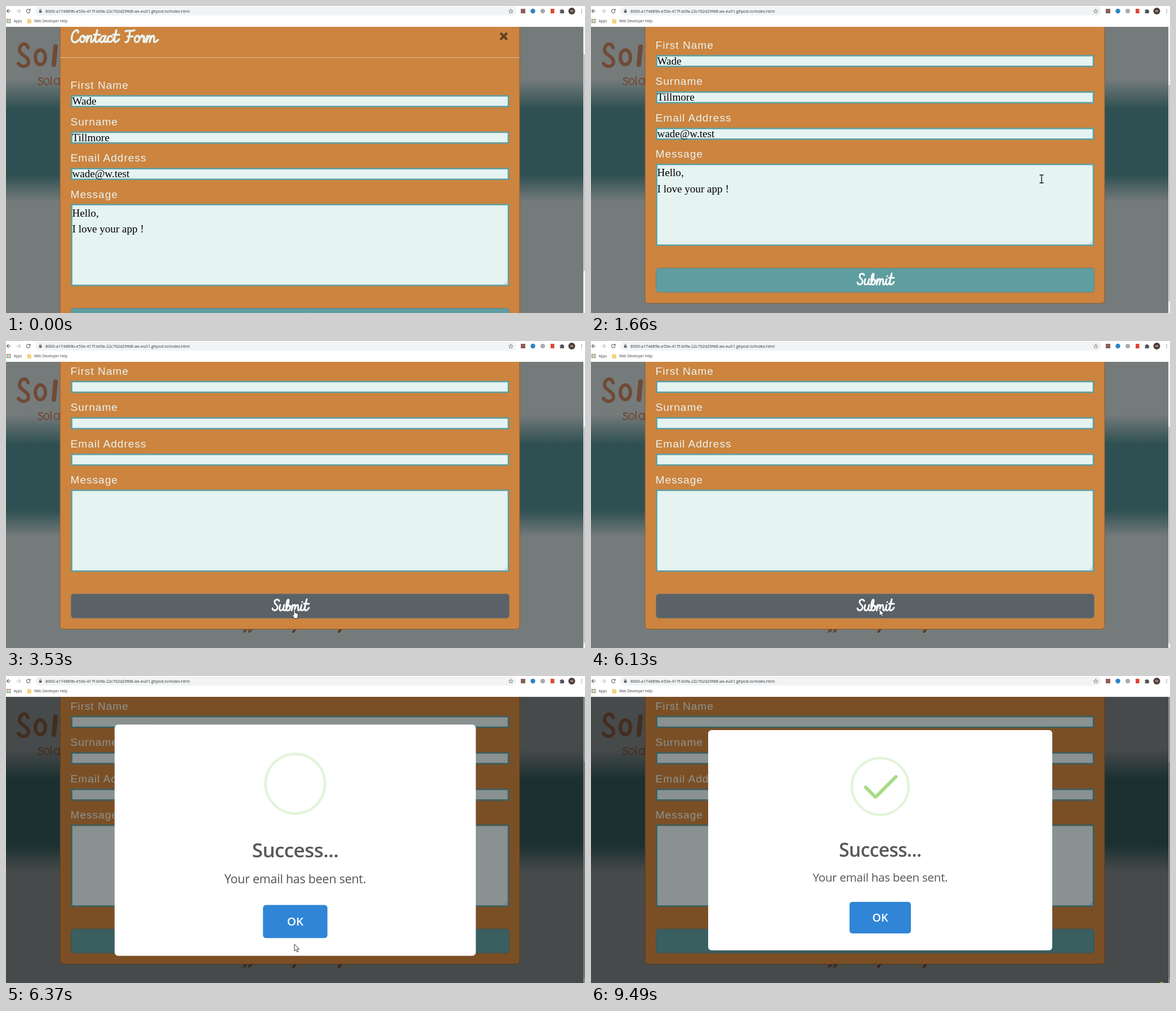
Write an HTML page that moves like this. It is 1028 px wide and 545 px high and loops after 9570 ms.

```html
<!DOCTYPE html>
<html lang="en">
<head>
<meta charset="utf-8">
<title>Contact form</title>
<style>
  html, body { margin: 0; width: 100%; height: 100%; overflow: hidden; background: #fff; }
  svg { display: block; width: 100%; height: 100%; }
  text { white-space: pre; }
  .ui { font-family: "Open Sans", "Noto Sans", sans-serif; }
  .label { font: 19.1px "Liberation Sans", Arial, sans-serif; letter-spacing: 1px; fill: #e9f4f2; }
  .value { font: 19.1px "Liberation Serif", "Times New Roman", serif; fill: #000; }
  .field { fill: #e5f3f1; stroke: #5f9ea0; stroke-width: 2.6; }
  .pen { fill: none; stroke-linecap: round; stroke-linejoin: round; }
  .mid { text-anchor: middle; }
</style>
</head>
<body>
<svg viewBox="0 0 1028 545" preserveAspectRatio="none">
  <defs>
    <linearGradient id="backdrop" gradientUnits="userSpaceOnUse" x1="0" y1="37" x2="0" y2="545">
      <stop offset=".183" stop-color="#757b7b"/>
      <stop offset=".287" stop-color="#2f5052"/>
      <stop offset=".518" stop-color="#2f5052"/>
      <stop offset=".612" stop-color="#757b7b"/>
    </linearGradient>
  </defs>

  <!-- page behind the form -->
  <rect y="37" width="1028" height="508" fill="url(#backdrop)"/>
  <g class="pen" stroke="#704a35">
    <path stroke-width="6" d="M39 74C37 64 25 66 24 77C23 87 40 89 40 99C40 109 27 109 22 102"/>
    <ellipse stroke-width="6" cx="61" cy="91" rx="9" ry="13"/>
    <path stroke-width="8" d="M88 72L85 104"/>
    <path stroke-width="2" d="M65 128Q57 126 58 131Q67 134 64 138Q61 142 57 138M80 125V140M95 128V140"/>
    <ellipse stroke-width="2" cx="72" cy="134" rx="4.5" ry="5.5"/>
    <ellipse stroke-width="2" cx="90" cy="134" rx="4.5" ry="5.5"/>
  </g>
  <path class="pen" stroke="#5c3820" stroke-width="2" d="M424 509L422 517M425 516L428 510M433 509L431 517M434 516L437 510M514 509Q513 518 509 517Q509 514 515 512M596 509Q594 518 590 517Q590 514 597 511"/>

  <!-- form, scrolled as one piece -->
  <g id="form">
    <rect x="96" y="0" width="816" height="599" rx="6" fill="#cc843f" stroke="#8a5a2c" stroke-width="1"/>
    <path class="pen" stroke="#e9f4f2" stroke-width="3.4" role="img" aria-label="Contact Form" transform="translate(115 64)"
      d="M13-17C15-24 4-22 2-10C0 2 9 3 14-4M23-11C17-13 14-2 19 0C25 1 27-9 23-11C22-7 26-7 28-9
      M30-11L28 0C30-7 33-12 36-11C38-9 34 0 37 0C41 0 45-12 47-21C44-10 42 0 45 0C48 0 50-3 51-5M41-13H52
      M61-10C55-14 50-3 53 0C57 2 60-5 62-11C59-3 59 0 62 0C64 0 65-3 66-5M73-9C72-13 65-10 65-4C65 1 71 1 74-3
      C78-7 80-14 81-21C78-10 76 0 79 0C82 0 84-3 86-5M75-13H86M97-19C102-22 108-18 113-21M105-19C104-10 103 2 97 0M101-10H110
      M120-11C114-13 111-2 116 0C122 1 124-9 120-11C120-7 123-7 125-9M127-12C124-10 127-9 129-10C133-12 127 0 130 0C132 0 133-3 134-6
      M136-11L134 0C136-7 139-12 141-11C143-9 140-3 140 0C141-7 145-12 147-11C150-9 146 0 149 0C152 0 153-2 155-4"/>
    <path class="pen" stroke="#5f4020" stroke-width="4" d="M879 49L888.500 58.500M888.500 49L879 58.500"/>
    <path stroke="#e3c3a0" d="M96 91.500H912"/>
    <g id="fields"></g>
    <path class="pen" stroke="#8a9494" stroke-width=".7" d="M885 494L890 489M888 494L890 492"/>
    <rect id="ring" x="113" y="534.500" width="783" height="47" rx="7" fill="none" stroke="#828a91" stroke-opacity=".5" stroke-width="4"/>
    <rect id="button" x="115.500" y="536.500" width="778" height="43" rx="5" stroke="#6c757d" stroke-width=".8"/>
    <path class="pen" stroke="#fff" stroke-width="2.800" role="img" aria-label="Submit" transform="translate(472 566)"
      d="M13-17C11-21 4-20 5-14C6-10 12-9 10-4C8 1 2 1 1-4M15-10C13-5 13 0 16 0C19 0 21-5 22-10C20-4 20 0 23 0
      C26 0 30-14 30-18C30-21 27-20 26-12C25-5 25 0 28 0C33 0 34-8 31-9C31-6 34-6 36-8
      M37-10L35 0C36-6 39-11 41-10C42-9 41-4 40 0C41-6 44-11 46-10C48-8 45 0 48 0C50 0 52-6 53-10C51-4 51 0 54 0
      C57 0 60-10 62-20C59-10 57 0 60 0C62 0 64-2 66-5M57-12H66M54-15h.1"/>
  </g>
  <rect x="1025" y="37" width="3" height="508" fill="#f1f1f1"/>
  <rect id="thumb" x="1025.500" y="86" width="2.500" height="384" fill="#c1c1c1"/>

  <!-- success dialog -->
  <rect id="shade" y="37" width="1028" height="508"/>
  <g id="dialog" class="ui">
    <rect x="208" y="96" width="611" height="391" rx="6" fill="#fff"/>
    <circle cx="513.500" cy="196" r="50.300" fill="none" stroke="#e3f4da" stroke-width="4.500"/>
    <g class="pen" stroke="#a5dc86" stroke-width="6"><path id="tip"/><path id="long"/></g>
    <text class="mid" x="513.500" y="321" font-size="33.500" font-weight="600" letter-spacing="-.6" fill="#595959">Success...</text>
    <text class="mid" x="513.500" y="364.500" font-size="20.500" letter-spacing="-.25" fill="#545454">Your email has been sent.</text>
    <rect x="459" y="401" width="109" height="56" rx="5" fill="#3085d6"/>
    <text class="mid" x="513.500" y="436" font-size="19.500" font-weight="600" fill="#fff">OK</text>
  </g>

  <!-- browser bar -->
  <g class="ui" font-size="6.200" fill="#3c4043">
    <rect width="1028" height="37" fill="#fff"/>
    <rect x="52" y="1" width="854" height="16" rx="8" fill="#f1f3f4"/>
    <g class="pen" stroke="#5f6368" stroke-width="1.100">
      <path d="M8 9H1.500M4.500 6L1.500 9L4.500 12"/>
      <path stroke="#bdc1c6" d="M18.500 9H25.500M22.500 6L25.500 9L22.500 12"/>
      <path d="M42.300 7.200A3.200 3.200 0 1 0 42.700 10M43 5.500V7.800H40.700"/>
      <path stroke-width=".8" d="M59.800 8V6.800A1.300 1.300 0 0 1 62.400 6.800V8"/>
      <path stroke-width=".7" d="M896.300 5.500L897.300 8.200L900.200 8.300L898 10L898.700 12.800L896.300 11.200L893.900 12.800L894.600 10L892.400 8.300L895.300 8.200Z"/>
    </g>
    <rect x="58.800" y="8" width="4.600" height="4" rx=".5" fill="#5f6368"/>
    <text x="70" y="12" font-size="7.260" fill="#303437">8000-a174689b-e53e-417f-b0fa-22c762d29fd8.ws-eu01.gitpod.io/index.html</text>
    <rect x="914" y="5" width="8" height="8" fill="#8b5e57"/>
    <circle cx="935.500" cy="9" r="4.200" fill="#2b83c6"/>
    <circle cx="953" cy="9" r="4" fill="#a9a9b2"/>
    <rect x="967" y="5" width="6.500" height="8" fill="#e0452f"/>
    <path fill="#50545a" d="M983.500 7H985.500A1.500 1.500 0 0 1 988.500 7H990.500V9A1.400 1.400 0 0 1 990.500 11.500V13H983.500V11.200A1.300 1.300 0 0 0 983.500 8.700Z"/>
    <circle cx="1004.500" cy="9" r="6" fill="#4e3a35"/>
    <text class="mid" x="1004.500" y="11.300" font-size="6" fill="#fff">W</text>
    <path class="pen" stroke="#5f6368" stroke-width="1.500" d="M1022 6.500h.01M1022 9.300h.01M1022 12.100h.01"/>
    <g id="apps"></g>
    <text x="13.800" y="29">Apps</text>
    <path fill="#f6d57a" stroke="#d9b653" stroke-width=".5" d="M38 23.500H41L42 24.500H44.500V30.500H38Z"/>
    <text x="50" y="29">Web Developer Help</text>
  </g>

  <ellipse id="spot" cx="1013" cy="546.500" rx="4.500" ry="3" fill="#b9c21f"/>
  <g id="cursor" stroke-linejoin="round">
    <path id="arrow" fill="#fff" stroke="#222" stroke-width=".9" d="M0 0V12L2.800 9.500L4.800 14L6.800 13.100L4.900 8.800H8.500Z"/>
    <path id="beam" fill="none" stroke="#111" stroke-width="1.300" d="M-3.500-7H-1Q0-7 0-6Q0-7 1-7H3.500M0-6V6M-3.500 7H-1Q0 7 0 6Q0 7 1 7H3.500"/>
    <path id="hand" fill="#fff" stroke="#222" stroke-width=".9" d="M-1 9.500V1.200Q.3-.5 1.500 1.200V5.500L5.300 6.600Q6.800 7.200 6.600 8.800L5.600 15.500H0L-3.600 10Q-3.200 8-1 9.500Z"/>
  </g>
</svg>
<script>
const LOOP = 9570;
const $ = id => document.getElementById(id);
const show = (id, on) => $(id).setAttribute("visibility", on ? "visible" : "hidden");
const clamp = v => Math.min(1, Math.max(0, v));
const ramp = (t, start, length) => clamp((t - start) / length);
const mix = (a, b, p) => a + (b - a) * p;
const smooth = p => p * p * (3 - 2 * p);

const held = (t, a, b, n) => {
  const gap = (b - a) / (n - 1);
  return a + gap * Math.floor((Math.min(t, b) - a) / gap + 1e-6);
};

// Interpolates rows of [position, ...values].
const track = (p, rows) => {
  let i = 0;
  while (i < rows.length - 2 && p > rows[i + 1][0]) i++;
  const [from, to] = [rows[i], rows[i + 1]];
  const k = ramp(p, from[0], to[0] - from[0]);
  return from.slice(1).map((v, j) => mix(v, to[j + 1], k));
};

const labels = ["First Name", "Surname", "Email Address", "Message"];
const values = ["Wade", "Tillmore", "wade@w.test"];
$("fields").innerHTML = labels.map((label, i) => {
  const y = 147 + i * 64.6;
  return `<text class="label" x="114.500" y="${y}">${label}</text>
    <rect class="field" x="116.500" y="${y + (i < 3 ? 12.5 : 11.7)}" width="775.500" height="${i < 3 ? 19 : 143.500}"/>
    ${i < 3 ? `<text class="value" x="117.500" y="${y + 28}">${values[i]}</text>` : ""}`;
}).join("") + `<text class="value" x="117.500" y="373.500">Hello,</text>
  <text class="value" x="117.500" y="402">I love your app !</text>`;
const typed = document.querySelectorAll(".value");

const appColors = ["#ea4335", "#fbbc05", "#34a853", "#4285f4"];
$("apps").innerHTML = Array.from({ length: 9 }, (_, i) =>
  `<rect x="${1 + i % 3 * 2.7}" y="${23 + (i / 3 | 0) * 2.7}" width="1.900" height="1.900" fill="${appColors[(i * 2 + (i / 3 | 0)) % 4]}"/>`).join("");

// start, end, steps, from x, y, to x, y
const moves = [
  [70, 1020, 14, 970, 490, 800, 307],
  [2100, 2730, 9, 800, 307, 505, 467],
  [3210, 3211, 2, 512, 477, 512, 477],
  [6130, 6131, 2, 512, 476, 512, 476],
  [7530, 8010, 7, 516, 476, 876, 556],
  [8710, 8870, 3, 1014, 541, 1014, 522],
  [8871, 9090, 4, 1015, 525, 1028, 545]
];

function drawCursor(t) {
  const visible = t >= 70 && t < 9090 && !(t >= 8010 && t < 8710);
  const move = moves.findLast(m => t >= m[0]) || moves[0];
  const [start, end, steps, x0, y0, x1, y1] = move;
  const linear = ramp(held(Math.max(t, start), start, end, steps), start, end - start);
  const p = start < 3000 ? smooth(linear) : linear;
  const x = mix(x0, x1, p), y = mix(y0, y1, p);
  const inside = t < 6130 && x < 893;
  const shape = inside && y > 449 ? "hand" : inside && y < 409 ? "beam" : "arrow";
  $("cursor").setAttribute("transform", `translate(${x} ${y})`);
  for (const id of ["arrow", "beam", "hand"]) show(id, visible && id === shape);
}

function drawForm(t) {
  const scroll = t < 1490 ? 0 : 87.5 * smooth(ramp(held(t, 1490, 1710, 4), 1443, 267));
  $("form").setAttribute("transform", `translate(0 ${-scroll})`);
  $("thumb").setAttribute("y", 86 + scroll * .76);
  typed.forEach(el => el.setAttribute("visibility", t < 3450 ? "visible" : "hidden"));
  show("ring", t >= 3370 && t < 3530);
  const hover = ramp(t, 2580, 150) - ramp(t, 6230, 130) * (t >= 6280);
  const [r, g, b] = track(hover, [[0, 95, 158, 160], [1, 90, 98, 104]]);
  $("button").setAttribute("fill", `rgb(${r},${g},${b})`);
}

// A diagonal stroke of the check mark, measured in icon ems.
function drawStroke(id, p, slope, rows) {
  const [x, y, width] = track(p, rows);
  const em = 19.1, half = (width - .3125) / 2 * Math.SQRT1_2 * em;
  const cx = 513.5 + (x - 2.5) * em, cy = 196 + (y - 2.5) * em;
  $(id).setAttribute("d", half > 0
    ? `M${cx - half} ${cy - half * slope}L${cx + half} ${cy + half * slope}` : "");
}

function drawDialog(t) {
  const open = t >= 6280;
  $("dialog").setAttribute("display", open ? "inline" : "none");
  const age = open ? held(t, 6280, 6990, 10) - 6224 : 0;
  $("shade").setAttribute("fill-opacity", .4 * clamp(age / 100));
  const [scale] = track(age / 300, [[0, .7], [.45, 1.05], [.8, .95], [1, 1]]);
  $("dialog").setAttribute("transform", `translate(513.5 291.5) scale(${scale}) translate(-513.5 -291.5)`);
  const p = clamp(age / 750);
  drawStroke("tip", p, 1, [[.54, .06, 1.34, 0], [.7, 1.19, 2.34, 3.125], [.84, 1.84, 3.16, 1.06], [1, 1.59, 3.03, 1.56]]);
  drawStroke("long", p, -1, [[.65, 2.125, 3.53, 0], [.84, 3.28, 2.34, 3.44], [1, 3.03, 2.53, 2.94]]);
}

const origin = performance.now();
function frame() {
  const t = (performance.now() - origin) % LOOP;
  drawForm(t);
  drawDialog(t);
  drawCursor(t);
  show("spot", t >= 9490);
  requestAnimationFrame(frame);
}
frame();
</script>
</body>
</html>
```
